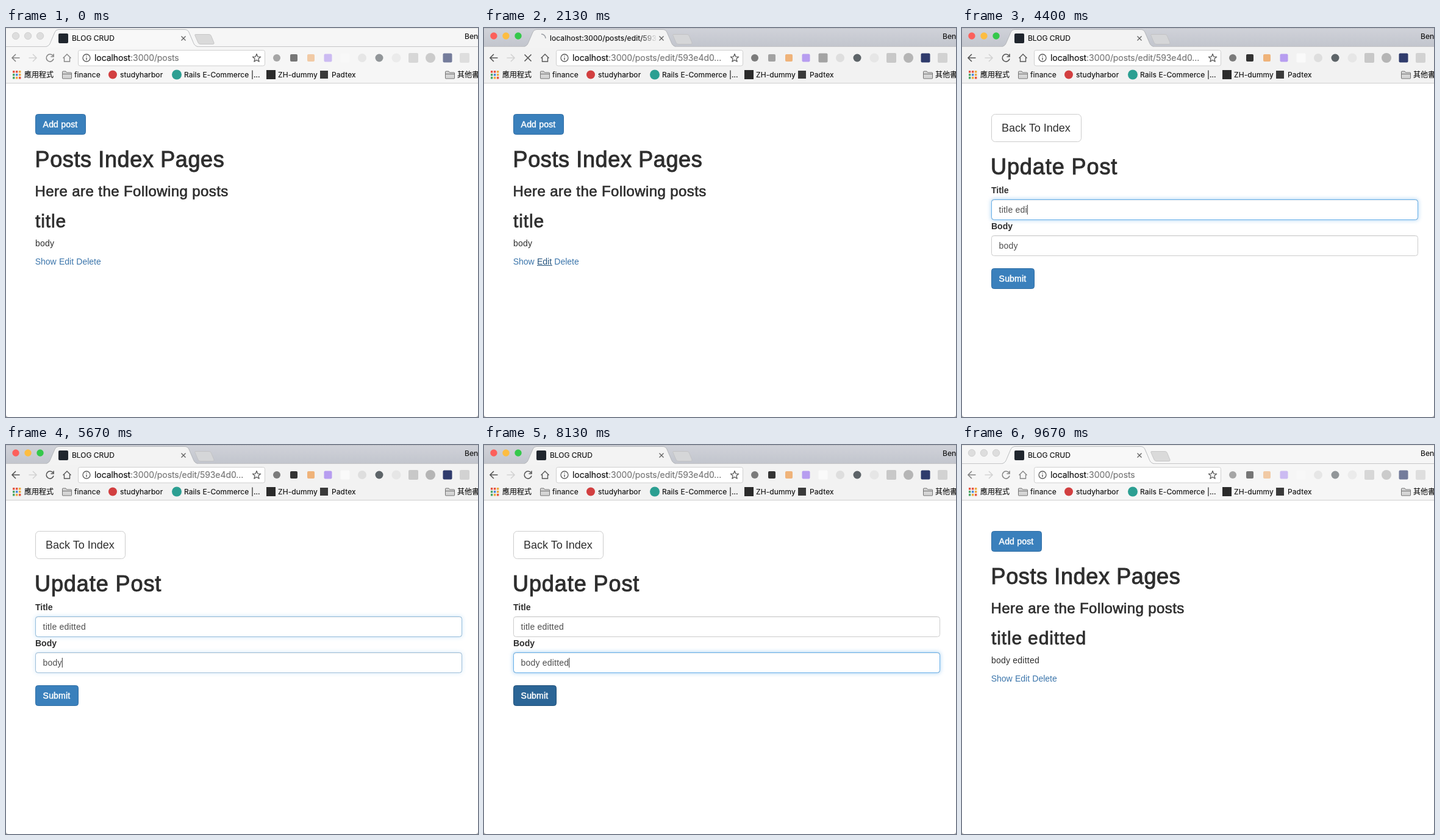
Animation, 774 px wide and 638 px high, one loop 9.74 s. Source, as an HTML page:

```html
<!DOCTYPE html>
<html lang="en">
<head>
<meta charset="utf-8">
<title>Blog editor</title>
<style>
  html, body { margin: 0; width: 100%; height: 100%; overflow: hidden; background: #fff; }
  svg { display: block; width: 774px; height: 638px; }
  text { white-space: pre; }
  .ui { font-family: Inter, Roboto, sans-serif; font-size: 12px; fill: #111; stroke: #111; stroke-width: .15px; letter-spacing: .1px; }
  .url { font-size: 14px; letter-spacing: -.08px; }
  .cjk { font-family: "Noto Sans CJK TC", "Noto Sans CJK", "Noto Sans CJK JP", sans-serif; letter-spacing: 0; }
  .web { font-family: "Liberation Sans", Arial, sans-serif; font-size: 14px; fill: #2e2e2e; }
  .head { stroke: #2e2e2e; stroke-width: .028em; }
  .btn { fill: #fff; stroke: #fff; stroke-width: .45px; letter-spacing: .2px; }
  .val { fill: #4e4e4e; letter-spacing: .2px; }
  .link { fill: #3b75ab; }
  .bold { font-weight: 700; }
  .line { fill: none; stroke-width: 1.6px; }
</style>
</head>
<body>
<svg id="stage" viewBox="0 0 774 638" xmlns="http://www.w3.org/2000/svg"></svg>
<script>
const LOOP = 9740;
const stage = document.getElementById('stage');

// Timeline in ms
const ACTIVE = [640, 9330];
const HOVER_EDIT = 1300;
const LOAD_EDIT = [1900, 2460];
const LOAD_INDEX = [8480, 8800];
const FOCUS_TITLE = 3480, FOCUS_BODY = 5600, HOVER_SUBMIT = 7980;
const TITLE_KEYS = [3930, 4080, 4210, 4340, 4500, 4650, 4800, 4960];
const BODY_KEYS = [6030, 6200, 6380, 6570, 6860, 7010, 7170, 7310, 7500, 7700];
const TITLE_STEPS = ['', ' ', ' e', ' ed', ' edi', ' edit', ' editt', ' editte', ' editted'];
const BODY_STEPS = ['', ' ', ' e', ' ed', ' edt', ' ed', ' edi', ' edit', ' editt', ' editte', ' editted'];

const text = (x, y, str, cls, extra = '') => `<text x="${x}" y="${y}" class="${cls}" ${extra}>${str}</text>`;
const box = (x, y, w, h, r, fill, extra = '') =>
  `<rect x="${x}" y="${y}" width="${w}" height="${h}" rx="${r}" fill="${fill}" ${extra}/>`;
const dot = (x, y, r, fill, extra = '') => `<circle cx="${x}" cy="${y}" r="${r}" fill="${fill}" ${extra}/>`;
const path = (d, extra = '') => `<path d="${d}" ${extra}/>`;
const size = (px, gap) => `style="font-size:${px}px;letter-spacing:${gap}px"`;
const button = (id, x, y, w, h, label) =>
  box(x + .5, y + .5, w - 1, h - 1, 4, '#3a80bc', `id="${id}" stroke="#306ea5"`) + text(x + 12.6, y + 22, label, 'web btn');

const folder = x => path(`M${x} 82.5V72q0-1 1-1h4.5l1.5 2h7q1 0 1 1v8.500q0 .5-.5 .5h-14q-.5 0-.5-.5zM${x} 75.500h15`,
  'fill="#d5d5d5" stroke="#747474"');

const apps = () => {
  const tones = ['#e5533f', '#e5533f', '#eca93c', '#4aa564', '#4a86d8', '#eca93c', '#4aa564', '#eca93c', '#e5533f'];
  return tones.map((c, i) => box(11 + i % 3 * 5, 70 + Math.floor(i / 3) * 5, 3.4, 3.4, .5, c)).join('');
};

// Toolbar badges, 28 px apart
const badges = () => [
  ['c', 6, '#7b7b7b'], ['s', 6, '#333', 'fontBadge'], ['s', 6, '#efb37a'], ['s', 6.5, '#b79df0'],
  ['s', 7.5, '#fafafa', 'pageBadge'], ['c', 7, '#dedede'], ['c', 6.5, '#5d6468'], ['c', 7.5, '#e6e6e6'],
  ['s', 8, '#c8c8c8'], ['c', 8, '#b5b5b5'], ['s', 7.5, '#2f3b6c'], ['s', 8, '#d2d2d2']
].map(([kind, r, fill, id], i) => {
  const x = 444 + 28 * i, tag = id ? `id="${id}"` : '';
  return kind === 'c' ? dot(x, 49, r, fill, tag) : box(x - r, 49 - r, 2 * r, 2 * r, 2, fill, tag);
}).join('');

const star = () => {
  let d = '';
  for (let i = 0; i < 10; i++) {
    const a = i * Math.PI / 5, r = i % 2 ? 3 : 7;
    d += `${i ? 'L' : 'M'}${(411 + r * Math.sin(a)).toFixed(2)} ${(49.5 - r * Math.cos(a)).toFixed(2)}`;
  }
  return path(d + 'z', 'fill="none" stroke="#5a5a5a" stroke-width="1.300" stroke-linejoin="round"');
};

const field = (id, y) =>
  box(48, y, 700, 34, 4, '#66afe9', `id="${id}Glow" filter="url(#glow)"`) +
  box(48.5, y + .5, 699, 33, 4, '#fff', 'stroke="#ccc"') +
  path(`M51 ${y + 1.5}H745`, 'stroke="#000" stroke-opacity=".06"') +
  box(48.5, y + .5, 699, 33, 4, 'none', `id="${id}Ring" stroke="#66afe9"`) +
  text(60.6, y + 22, '', 'web val', `id="${id}Text"`) +
  box(0, y + 9, 1, 16, 0, '#333', `id="${id}Caret"`);

const tabEdge = 'M66 30.500C71 29 72 26 74 21L80 7Q82 2.500 86 2.500H293Q298 2.500 300 7L306 21C308 26 309 29 314 30.500';

const chrome = () => `
  <rect id="strip" width="774" height="31"/>
  ${path('M0 .5H774', 'stroke="#000" stroke-opacity=".08"')}
  ${[16, 36, 56].map((x, i) => dot(x, 13, 5.7, '', `id="light${i}"`)).join('')}
  ${box(0, 30, 774, 61, 0, '', 'id="bar"')}
  ${path('M0 30.5H66M312 30.5H774', 'stroke="#b9b9bc" stroke-opacity=".8"')}
  ${path(tabEdge + 'V32H66z', 'id="tab"')}
  ${path(tabEdge, 'fill="none" stroke="#a9abaf" stroke-width=".8"')}
  ${path('M311 10.500H333Q335.500 10.500 336.500 13L341 24Q342 26.500 339 26.500H319Q316 26.500 315 24L310 12.500Q309 10.500 311 10.500z', 'id="newTab" stroke="#bfbfc1" stroke-width=".8"')}
  <g id="idleTab">${box(86, 9, 16, 16, 2, '#20262e')}${text(108, 21, 'BLOG CRUD', 'ui', 'style="letter-spacing:0"')}</g>
  <g id="busyTab">
    ${path('M94 10A7 7 0 0 1 101 17', 'id="spinner" class="line" stroke="#9a9da3"')}
    <g clip-path="url(#tabClip)">${text(108, 21, 'localhost:3000/posts/edit/593e4d', 'ui')}</g>
    ${box(256, 8, 28, 18, 0, 'url(#fade)')}
  </g>
  ${path('M287.500 13.500l7 7m0-7l-7 7', 'class="line" stroke="#606060" style="stroke-width:1.300px"')}
  ${text(752, 18, 'Ben', 'ui')}
  <g id="nav" class="line">
    ${path('M22.500 49H10.500M16 43L10 49L16 55')}
    ${path('M37.500 49H49.500M44 43L50 49L44 55', 'stroke="#d3d3d3"')}
    ${path('M77 45.500A6 6 0 1 0 78 50.500M78 42.500V47H73.500', 'id="reload"')}
    ${path('M66.500 43.500l11 11m0-11l-11 11', 'id="stop"')}
    ${path('M93.500 49.500L100 43L106.500 49.500M95.500 48.500V55H104.500V48.500', 'style="stroke-width:1.400px"')}
  </g>
  ${box(118.5, 36.5, 306, 25.5, 3, '#fff', 'stroke="#cfcfcf"')}
  ${dot(132, 49, 6, 'none', 'stroke="#5a5a5a" stroke-width="1.300"')}
  ${path('M132 48.500V52.500M132 45.500V46.800', 'class="line" stroke="#5a5a5a" style="stroke-width:1.400px"')}
  <text x="145" y="54" class="ui url">localhost<tspan id="address" fill="#777" stroke="#777"></tspan></text>
  ${star()}
  <g id="badges">${badges()}</g>
  ${apps()}${text(30, 81, '應用程式', 'ui cjk')}
  ${folder(92.5)}${text(112, 81, 'finance', 'ui')}
  ${dot(175, 76.5, 7, '#d23f40')}${text(187, 81, 'studyharbor', 'ui')}
  ${dot(280, 76.5, 8, '#2c9f92')}${text(292, 81, 'Rails E-Commerce |...', 'ui')}
  ${box(427, 69, 15, 15, 0, '#2b2b2b')}${text(446, 81, 'ZH-dummy', 'ui')}
  ${box(515, 70, 13, 13, 0, '#3a3a3a')}${text(534, 81, 'Padtex', 'ui')}
  ${folder(720.5)}${text(740, 81, '其他書籤', 'ui cjk')}
  ${path('M0 90.500H774', 'stroke="#cfcfcf"')}`;

const indexPage = () => `
  ${button('add', 48, 141, 83, 34, 'Add post')}
  ${text(47.5, 228, 'Posts Index Pages', 'web head', size(36, .63))}
  ${text(47.5, 276, 'Here are the Following posts', 'web head', size(24, .42))}
  ${text(48, 327, '', 'web head', 'id="postTitle" ' + size(30, .85))}
  ${text(48, 358, '', 'web', 'id="postBody" ' + size(14, .22))}
  ${text(47.7, 388, 'Show', 'web link')}
  ${text(87, 388, 'Edit', 'web link', 'id="edit"')}
  ${path('M87 389.500H112', 'id="underline" stroke="#23527c"')}
  ${text(115.3, 388, 'Delete', 'web link')}`;

const editPage = () => `
  ${box(48.5, 141.5, 147, 45, 6, '#fff', 'stroke="#ccc"')}
  ${text(65, 170, 'Back To Index', 'web', size(18, 0))}
  ${text(47, 240, 'Update Post', 'web head', size(36, .92))}
  ${text(48, 271, 'Title', 'web bold')}
  ${text(48, 330, 'Body', 'web bold')}
  ${field('title', 281)}
  ${field('body', 340)}
  ${button('submit', 48, 394, 71, 34, 'Submit')}`;

stage.innerHTML = `
  <defs>
    <linearGradient id="steel" x2="0" y2="1"><stop stop-color="#d0d2d9"/><stop offset="1" stop-color="#c2c5cd"/></linearGradient>
    <linearGradient id="fade"><stop stop-color="#f3f3f3" stop-opacity="0"/><stop offset="1" stop-color="#f3f3f3"/></linearGradient>
    <filter id="glow" x="-5%" y="-60%" width="110%" height="220%"><feGaussianBlur stdDeviation="3.500"/></filter>
    <clipPath id="tabClip"><rect x="106" y="6" width="177" height="22"/></clipPath>
  </defs>
  <rect width="774" height="638" fill="#fff"/>
  <g id="indexPage">${indexPage()}</g>
  <g id="editPage">${editPage()}</g>
  ${chrome()}
  ${path('M0 634Q0 638 4 638H0zM774 634Q774 638 770 638H774z', 'fill="#a8a8a8"')}`;

const el = {};
stage.querySelectorAll('[id]').forEach(n => el[n.id] = n);
const set = (id, name, value) => el[id].setAttribute(name, value);
const show = (id, on) => set(id, 'visibility', on ? 'inherit' : 'hidden');
const write = (id, str) => { if (el[id].textContent !== str) el[id].textContent = str; };
const within = (t, [a, b]) => t >= a && t < b;

// Focus ring eases in and out over 150 ms
const ease = p => { p = Math.min(1, Math.max(0, p)); return p * p * (3 - 2 * p); };
const focusLevel = (t, from, to) => ease((t - from) / 150) - ease((t - to) / 150);

function drawField(id, t, from, to, keys, steps) {
  const typed = keys.filter(k => k <= t).length;
  const last = typed ? keys[typed - 1] : from;
  write(id + 'Text', id + steps[typed]);
  const level = focusLevel(t, from, to);
  set(id + 'Ring', 'opacity', level);
  set(id + 'Glow', 'opacity', level * .6);
  const lit = within(t, [from, to]) && (t - last) % 1000 < 500;
  show(id + 'Caret', lit);
  if (lit) set(id + 'Caret', 'x', 60.6 + el[id + 'Text'].getComputedTextLength());
}

function drawChrome(t, loading) {
  const on = within(t, ACTIVE);
  set('strip', 'fill', on ? 'url(#steel)' : '#f6f6f6');
  set('tab', 'fill', on ? '#f3f3f3' : '#f8f8f8');
  set('bar', 'fill', on ? '#f2f2f2' : '#f6f6f6');
  set('newTab', 'fill', on ? '#d5d6d8' : '#dadada');
  ['#fc605b', '#fdbd41', '#34c84a'].forEach((c, i) => {
    set('light' + i, 'fill', on ? c : '#dddddd');
    set('light' + i, 'stroke', on ? 'none' : '#d1d1d1');
  });
  set('nav', 'stroke', on ? '#555' : '#858585');
  set('badges', 'opacity', on ? 1 : .65);

  show('idleTab', !loading);
  show('busyTab', loading);
  show('reload', !loading);
  show('stop', loading);
  set('spinner', 'transform', `rotate(${-(t - 2130) * .27} 94 17)`);
  set('fontBadge', 'fill', loading ? '#a2a2a2' : '#333');
  const fresh = within(t, [LOAD_EDIT[0], 3300]) || within(t, LOAD_INDEX);
  set('pageBadge', 'fill', fresh ? '#a3a3a3' : '#fafafa');
  write('address', ':3000/posts' + (within(t, [LOAD_EDIT[0], LOAD_INDEX[1]]) ? '/edit/593e4d0...' : ''));
}

function draw(t) {
  const loading = within(t, LOAD_EDIT) || within(t, LOAD_INDEX);
  const editing = within(t, [LOAD_EDIT[1], LOAD_INDEX[1]]);
  drawChrome(t, loading);
  show('indexPage', !editing);
  show('editPage', editing);

  const saved = t >= LOAD_INDEX[1] ? ' editted' : '';
  write('postTitle', 'title' + saved);
  write('postBody', 'body' + saved);
  const hover = within(t, [HOVER_EDIT, LOAD_EDIT[1]]);
  show('underline', hover);
  el.edit.style.fill = hover ? '#23527c' : '';

  drawField('title', t, FOCUS_TITLE, FOCUS_BODY, TITLE_KEYS, TITLE_STEPS);
  drawField('body', t, FOCUS_BODY, LOAD_INDEX[0] - 80, BODY_KEYS, BODY_STEPS);
  const dark = t >= HOVER_SUBMIT;
  set('submit', 'fill', dark ? '#2b6596' : '#3a80bc');
  set('submit', 'stroke', dark ? '#23527a' : '#306ea5');
}

const start = performance.now();
function tick() {
  draw((performance.now() - start) % LOOP);
  requestAnimationFrame(tick);
}
tick();
</script>
</body>
</html>
```
